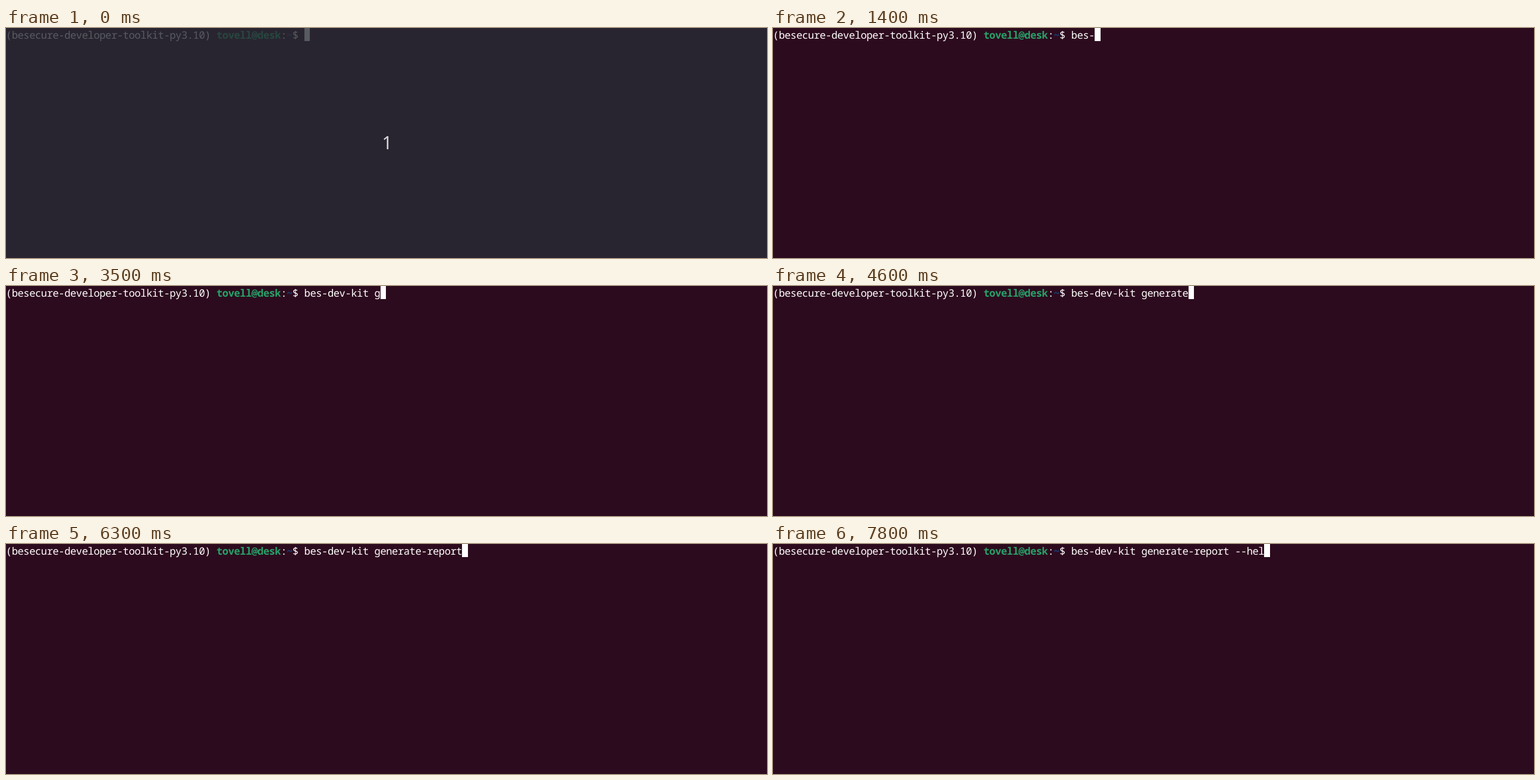
These frames come from a looping animation (1280 px wide and 387 px high, 8 s). An HTML page:

```html
<!DOCTYPE html>
<html lang="en">
<head>
<meta charset="utf-8">
<title>Terminal session</title>
<style>
  html, body { margin: 0; width: 100%; height: 100%; overflow: hidden; background: #2d0b1e; }
  svg { display: block; width: 1280px; height: 387px; }
  .line {
    font: 500 17.2px "Noto Sans Mono", "DejaVu Sans Mono", monospace;
    letter-spacing: -.475px;
    font-variant-ligatures: none;
    text-rendering: geometricPrecision;
    white-space: pre;
    fill: #fff;
  }
  .user { fill: #26a269; font-weight: 700; }
  .path { fill: #12488b; font-weight: 700; }
  .count { font: 30px "Noto Sans", "Open Sans", sans-serif; fill: #d6d6d9; text-anchor: middle; }
</style>
</head>
<body>
<svg viewBox="0 0 1280 387">
  <rect width="1280" height="387" fill="#2d0b1e"/>
  <text class="line" x="-.2" y="17.5">(besecure-developer-toolkit-py3.10) <tspan class="user">tovell@desk</tspan>:<tspan class="path">~</tspan>$ <tspan id="typed"></tspan></text>
  <rect id="cursor" height="22" fill="#fff"/>
  <g id="countdown">
    <rect width="1280" height="387" fill="#282d35" opacity=".78"/>
    <text class="count" x="641" y="204">1</text>
  </g>
</svg>
<script>
  const LOOP = 8000;
  const TICK = 100;
  const CELL = 9.8452;
  const PROMPT_COLS = 51;

  // Each burst is typed at a steady pace (ms per key) from its start time.
  const BURSTS = [
    { text: "bes-", start: 700, pace: 220 },
    { text: "dev", start: 1700, pace: 140 },
    { text: "-", start: 2400, pace: 0 },
    { text: "kit ", start: 2800, pace: 120 },
    { text: "generate", start: 3480, pace: 157 },
    { text: "-", start: 5100, pace: 0 },
    { text: "report", start: 5665, pace: 122 },
    { text: " --hel", start: 6860, pace: 185 }
  ];

  const snap = time => Math.round(time / TICK) * TICK;
  const edge = col => Math.floor(col * CELL);

  const keys = BURSTS.flatMap(({ text, start, pace }) =>
    [...text].map((char, i) => ({ char, time: snap(start + i * pace) })));

  const typed = document.getElementById("typed");
  const cursor = document.getElementById("cursor");
  const countdown = document.getElementById("countdown");

  function draw() {
    const t = performance.now() % LOOP;
    const shown = keys.filter(key => key.time <= t);
    const col = PROMPT_COLS + shown.length;
    typed.textContent = shown.map(key => key.char).join("");
    cursor.setAttribute("x", edge(col));
    cursor.setAttribute("width", edge(col + 1) - edge(col));
    countdown.style.display = t < TICK ? "" : "none";
    requestAnimationFrame(draw);
  }
  draw();
</script>
</body>
</html>
```
